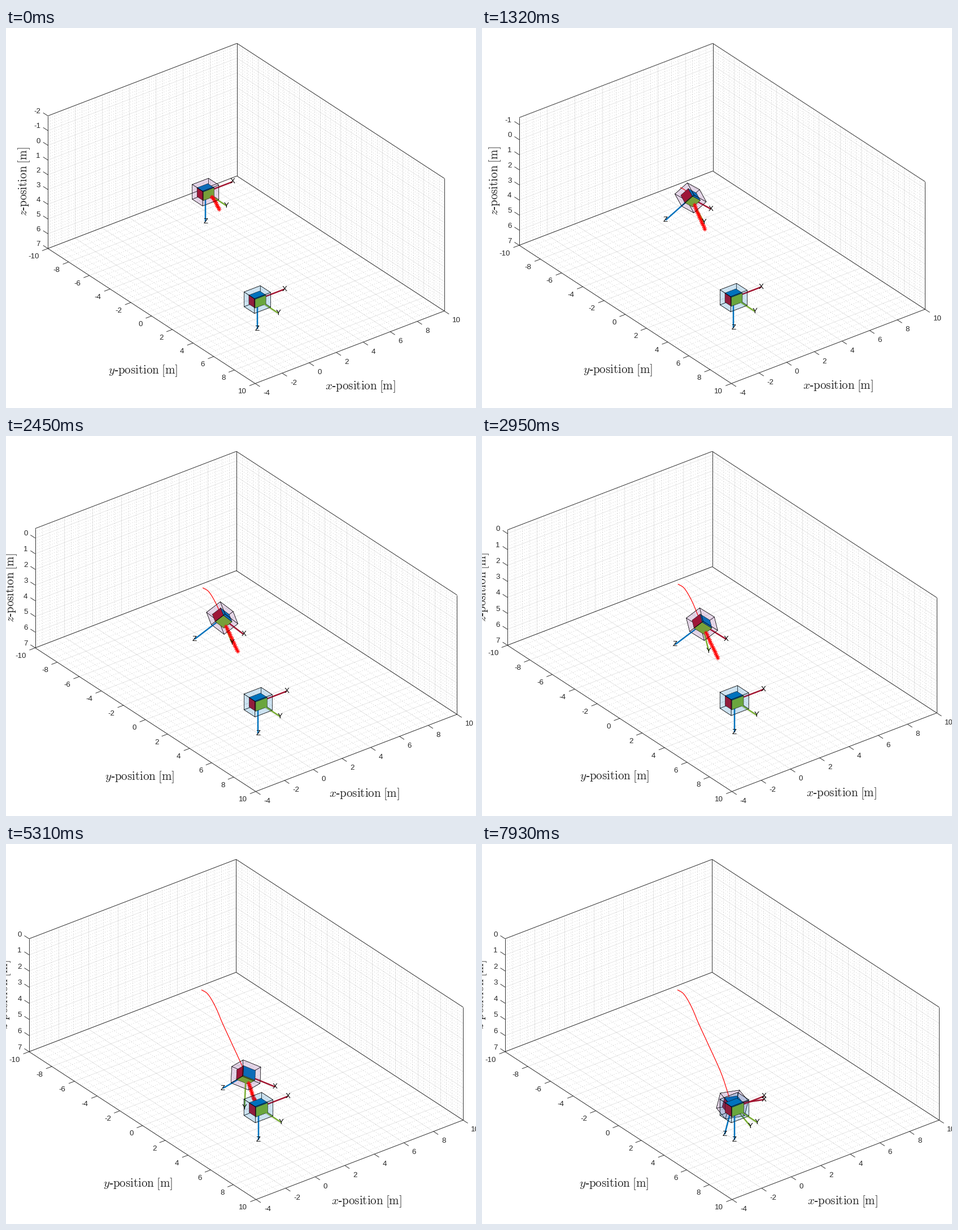
Animation, 832 px wide and 673 px high, one loop 8000 ms. Source, as a matplotlib script:

```python
import itertools

import matplotlib.pyplot as plt
import numpy as np
from matplotlib.animation import FuncAnimation
from matplotlib.collections import LineCollection

W, H, DPI = 832, 673, 100
FRAMES, STEP = 80, 100
PX = 72 / DPI  # points per pixel

plt.rcParams["font.family"] = "Liberation Sans"
plt.rcParams["mathtext.fontset"] = "cm"

INK = (0.15, 0.15, 0.15)
AXIS_COLORS = ("#A2142F", "#77AC30", "#0072BD")
LOW, HIGH = np.array([-4, -10]), np.array([10, 10])
FLOOR = 7
HORIZON = 1.8


def view_frame(u, v):
    """Orthonormal rows: right, down, into the screen."""
    u = u / np.linalg.norm(u)
    v = v - u * (u @ v)
    v = v / np.linalg.norm(v)
    return np.array([u, v, np.cross(u, v)])


az, el = np.radians(37.5), np.radians(30)
VIEW = view_frame(
    np.array([np.cos(az), np.sin(az), 0]),
    np.array([-np.sin(az) * np.sin(el), np.cos(az) * np.sin(el), np.cos(el)]),
)
GOAL = np.array([0, 5, 5])

# Chaser position (y, z) and axis directions on the screen at key times
POS_T = np.array([0, 0.82, 1.82, 2.45, 3.49, 5.31, 6.84, 7.93])
POS = np.array([[0, 0], [0.54, 0.01], [1.30, 0.58], [1.745, 1.126],
                [2.53, 1.97], [3.87, 3.455], [4.543, 4.58], [4.817, 4.893]])
ROT_T = np.array([0, 0.82, 1.82, 2.45, 3.49, 5.31, 7.93])
ROT = np.array([
    np.r_[VIEW[0], VIEW[1]],
    [0.714, 0.435, -0.517, 0.082, 0.706, 0.722],
    [0.503, 0.343, -0.790, 0.479, 0.687, 0.607],
    [0.593, 0.265, -0.764, 0.460, 0.694, 0.600],
    [0.720, 0.098, -0.689, 0.364, 0.803, 0.515],
    [0.780, -0.038, -0.614, 0.318, 0.909, 0.379],
    [0.841, 0.477, -0.205, -0.144, 0.568, 0.795],
])
TOP_T = np.array([0, 0.82, 1.82, 2.45, 3.25])
TOP = np.array([[-2], [-1.76], [-1.13], [-0.61], [0]])


def spline(t, ts, ps):
    """Cubic Hermite curve through the key values."""
    t = np.clip(np.atleast_1d(t), ts[0], ts[-1])
    slope = np.gradient(ps, ts, axis=0)
    i = np.clip(np.searchsorted(ts, t) - 1, 0, len(ts) - 2)
    h = (ts[i + 1] - ts[i])[:, None]
    s = (t - ts[i])[:, None] / h
    return ((2 * s**3 - 3 * s**2 + 1) * ps[i] + (s**3 - 2 * s**2 + s) * h * slope[i]
            + (3 * s**2 - 2 * s**3) * ps[i + 1] + (s**3 - s**2) * h * slope[i + 1])


def place(t):
    p = spline(t, POS_T, POS)
    return np.c_[np.zeros(len(p)), p]


class Camera:
    def __init__(self, top):
        self.top = top
        self.scale = 602.4 / (12.195 + 0.866 * (FLOOR - top))
        self.center = np.array([3, 0, (FLOOR + top) / 2])

    def __call__(self, *p):
        q = np.asarray(p[0] if len(p) == 1 else p, float) - self.center
        return np.array([424.5, 327.9]) + self.scale * q @ VIEW[:2].T


fig = plt.figure(figsize=(W / DPI, H / DPI), dpi=DPI, facecolor="white")
ax = fig.add_axes([0, 0, 1, 1])


def label(x, y, s, ha="center", color=INK, **kw):
    ax.text(x, y, s, ha=ha, va="center", color=color, zorder=900,
            **{"fontsize": 13.3 * PX, **kw})


def grid_lines(cam, xs, ys, zs):
    (x0, y0), (x1, y1) = LOW, HIGH
    segs = []
    for x in xs:
        segs += [(cam(x, y0, FLOOR), cam(x, y1, FLOOR)), (cam(x, y0, cam.top), cam(x, y0, FLOOR))]
    for y in ys:
        segs += [(cam(x0, y, FLOOR), cam(x1, y, FLOOR)), (cam(x1, y, cam.top), cam(x1, y, FLOOR))]
    for z in zs:
        segs += [(cam(x0, y0, z), cam(x1, y0, z)), (cam(x1, y0, z), cam(x1, y1, z))]
    return segs


def draw_axes(cam):
    (x0, y0), (x1, y1) = LOW, HIGH
    xs, ys = np.arange(x0, x1 + 1, 2), np.arange(y0, y1 + 1, 2)
    zs = np.arange(np.ceil(cam.top - 0.01), FLOOR + 1)
    fine_x = [x for x in np.arange(x0, x1, 0.5) if x % 2]
    fine_y = [y for y in np.arange(y0, y1, 0.5) if y % 2]
    fine_z = [n / 5 for n in range(int(np.ceil(cam.top * 5)), FLOOR * 5) if n % 5]

    ax.add_collection(LineCollection(grid_lines(cam, fine_x, fine_y, fine_z), zorder=1,
                                     colors=[(0.1, 0.1, 0.1, 0.27)], linewidths=0.8 * PX,
                                     linestyles=[(0, (1.25, 3.75))]))
    ax.add_collection(LineCollection(grid_lines(cam, xs, ys, zs), zorder=2,
                                     colors=[(0.15, 0.15, 0.15, 0.15)], linewidths=0.8 * PX))

    near, right = cam(x0, y1, FLOOR), cam(x1, y1, FLOOR)
    left, back = cam(x0, y0, FLOOR), cam(x1, y0, FLOOR)
    left_top, back_top, right_top = (cam(x, y, cam.top) for x, y in ((x0, y0), (x1, y0), (x1, y1)))
    segs = [(near, right), (near, left), (left, back), (back, right), (left, left_top),
            (back, back_top), (right, right_top), (left_top, back_top), (back_top, right_top)]

    along_x = VIEW[:2, 0] / np.linalg.norm(VIEW[:2, 0])
    along_y = VIEW[:2, 1] / np.linalg.norm(VIEW[:2, 1])
    for x in xs:
        p = cam(x, y1, FLOOR)
        segs.append((p, p + 10 * along_y))
        label(p[0] + 14.3, p[1] + 17.3, f"{x:.0f}", "left")
    for y in ys:
        p = cam(x0, y, FLOOR)
        segs.append((p, p - 11 * along_x))
        label(p[0] - 15.7, p[1] + 14.7, f"{y:.0f}", "right")
    for z in zs:
        p = cam(x0, y0, z)
        segs.append((p, p - 10 * along_y))
        label(p[0] - 13.3, p[1] - 7.3, f"{z + 0.0:.0f}", "right")
    ax.add_collection(LineCollection(segs, colors=[INK], linewidths=0.9 * PX, zorder=3))

    zoom = (cam.scale - 30.13) / 2.87
    text = r"${}$-$\mathrm{{position}}$ $\mathrm{{[m]}}$"
    style = dict(fontsize=20.9 * PX, fontfamily="Liberation Serif")
    label(627 + 10.5 * zoom, 634.5 - 2 * zoom, text.format("x"), **style)
    label(242 - 9 * zoom, 607 - 5 * zoom, text.format("y"), **style)
    label(left[0] - 42.5, 271.5 - 5 * zoom, text.format("z"), rotation=90, **style)


def draw_body(cam, pos, pose, shell, layer, trace=None, ahead=None):
    origin = cam(pos)
    outer, inner = np.array([0.6, 0.5, 0.5]), np.array([0.4, 0.3, 0.3])

    def at(b):
        return origin + cam.scale * np.asarray(b) @ pose[:2].T

    def faces(size, front, color, alpha):
        for i in range(3):
            sign = -np.sign(pose[2, i]) * (1 if front else -1)
            j, k = (i + 1) % 3, (i + 2) % 3
            quad = np.zeros((4, 3))
            quad[:, i] = sign * size[i]
            quad[:, j] = size[j] * np.array([-1, 1, 1, -1])
            quad[:, k] = size[k] * np.array([-1, -1, 1, 1])
            pts = at(quad)
            ax.fill(*pts.T, color=color or AXIS_COLORS[i], alpha=alpha, lw=0, zorder=next(layer))
            ax.plot(*np.vstack([pts, pts[:1]]).T, color="black", lw=0.5 * PX,
                    solid_joinstyle="round", zorder=next(layer))

    def arrows(front):
        for i in range(3):
            if (pose[2, i] < 0) == front:
                axis = np.eye(3)[i]
                start = inner[i] if front else 0
                ends = at([axis * start, axis * 2])
                ax.plot(*ends.T, color=AXIS_COLORS[i], lw=2.5 * PX,
                        solid_capstyle="butt", zorder=next(layer))

    faces(outer, False, shell, 0.1)
    if trace is not None:
        ax.plot(*cam(trace).T, color="red", lw=1.2 * PX, zorder=next(layer))
    arrows(False)
    faces(inner, True, None, 1)
    arrows(True)
    if ahead is not None:
        pts = cam(ahead)
        pts = pts[np.hypot(*(pts - origin).T) > 0.4 * cam.scale]
        ax.plot(*pts.T, ls="none", marker=(8, 2, 0), ms=7.5 * PX, mec="red",
                mew=0.6 * PX, zorder=next(layer))
    faces(outer, True, shell, 0.1)
    for i, name in enumerate("XYZ"):
        label(*at(2 * np.eye(3)[i]), name, color="black")


def draw(n):
    t = 0 if n == 0 else min(n * STEP / 1000 + 0.05, POS_T[-1])
    ax.clear()
    ax.axis("off")
    ax.set_xlim(-0.5, W - 0.5)
    ax.set_ylim(H - 0.5, -0.5)

    cam = Camera(min(spline(t, TOP_T, TOP)[0, 0], 0))
    draw_axes(cam)
    layer = itertools.count(10)
    rot = spline(t, ROT_T, ROT)[0]
    trace = place(np.linspace(0, t, 80))
    ahead = place(t + np.linspace(0, HORIZON, 21))
    draw_body(cam, place(t)[0], view_frame(rot[:3], rot[3:]), "#7E2F8E", layer, trace, ahead)
    draw_body(cam, GOAL, VIEW, "#0072BD", layer)
    return []


anim = FuncAnimation(fig, draw, frames=FRAMES, init_func=lambda: [], interval=STEP,
                     repeat=True, repeat_delay=0, blit=False)
plt.show()
```
